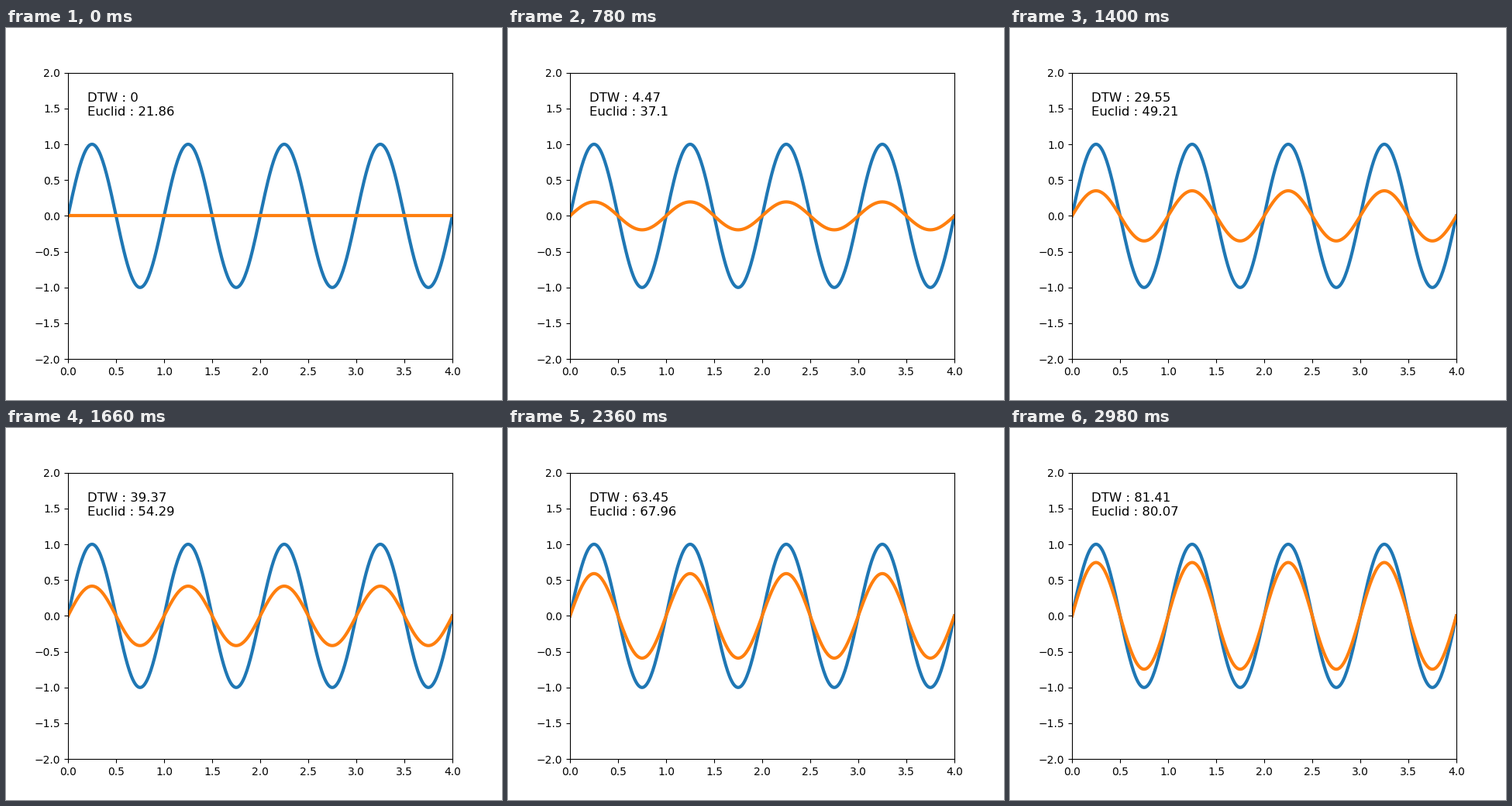
A matplotlib script that plays this animation: 640x480 px, repeating every 3 s.

```python
import numpy as np
import matplotlib.pyplot as plt
from matplotlib.animation import FuncAnimation

plt.rcParams["font.family"] = "DejaVu Sans"

FRAMES = 150
STEP = 0.005  # amplitude gained per frame


def score(gap, scale, power=1):
    """Similarity in percent, falling with the amplitude gap, never below 0."""
    value = round(100 - scale * gap ** power, 2)
    return max(0, value)


fig, ax = plt.subplots(figsize=(6.4, 4.8), dpi=100)
ax.set_xlim(0, 4)
ax.set_ylim(-2, 2)

t = np.linspace(0, 4, 401)
wave = np.sin(2 * np.pi * t)
ax.plot(t, wave, color="tab:blue", lw=3)
scaled, = ax.plot(t, 0 * t, color="tab:orange", lw=3)
dtw_text = ax.text(0.2, 1.6, "", fontsize=11.87)
euclid_text = ax.text(0.2, 1.4, "", fontsize=11.87)


def update(i):
    amp = i * STEP
    scaled.set_ydata(amp * wave)
    dtw_text.set_text(f"DTW : {score(1 - amp, 130.1, 1.424)}")
    euclid_text.set_text(f"Euclid : {score(1 - amp, 78.14)}")
    return scaled, dtw_text, euclid_text


anim = FuncAnimation(fig, update, frames=FRAMES, interval=20,
                     repeat=True, repeat_delay=0)
plt.show()
```
